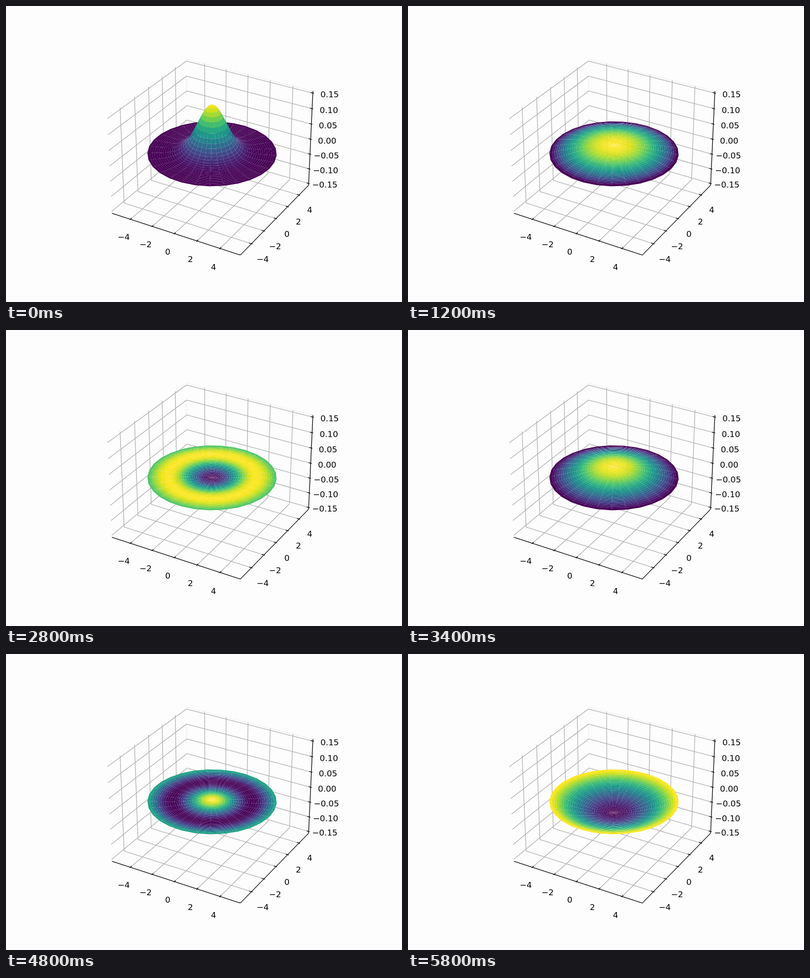
These frames come from a looping animation (800 px wide and 600 px high, 6 s). An HTML page with a canvas:

```html
<!DOCTYPE html>
<html lang="en">
<head>
<meta charset="utf-8">
<title>Vibrating membrane</title>
<style>
html, body { margin: 0; width: 100%; height: 100%; overflow: hidden; background: #fdfdfd; }
canvas { display: block; }
</style>
</head>
<body>
<canvas id="stage" width="800" height="600"></canvas>
<script>
const ctx = document.getElementById('stage').getContext('2d');

const STEP = 200, STEPS = 30;
const RADIUS = 5, RINGS = 29, SECTORS = 29;
const XY = 5.5 * 25 / 24, Z = 0.15 * 25 / 24;   // padded half sizes of the box
const TICK = 11 / 12;
const LINE = 1.33;

// Perspective camera: elevation 30, azimuth -60, distance 10.
const S3 = Math.sqrt(3);
function project(x, y, z) {
  const a = x / 11 * 8 / 7, b = y / 11 * 8 / 7, c = z / 0.3 * 6 / 7;
  const depth = 10 - (a * S3 / 4 - b * 0.75 + c / 2);
  const right = a * S3 / 2 + b / 2;
  const up = -a / 4 + b * S3 / 4 + c * S3 / 2;
  const k = 2497.3 / depth;
  return [416.24 + k * right, 296.76 - k * up, depth];
}

// Bessel function of order zero, from its integral form.
function bessel0(x) {
  let sum = 0;
  for (let i = 0; i < 24; i++) sum += Math.cos(x * Math.sin(Math.PI * (i + 0.5) / 24));
  return sum / 24;
}

const mix = (a, b, t) => a + (b - a) * t;
function smooth(from, to, t) {
  const u = Math.min(1, Math.max(0, (t - from) / (to - from)));
  return u * u * (3 - 2 * u);
}

// A hill that spreads into a dome, at p = distance / radius.
function hill(p, n) {
  const t = Math.min(n, 4);
  const peak = 0.152 + 0.0176 * t - 0.0096 * t * t;
  const narrow = Math.exp(-((p * RADIUS / 1.13) ** 2) / 2);
  return peak * mix(narrow, 1 - p * p, t / 4);
}

// The two lowest standing waves of a round membrane.
function standing(p, n) {
  const first = -0.04 * Math.cos(Math.PI * (n - 9.1) / 9.8);
  const second = -0.0045 * Math.cos(Math.PI * (n - 12) / 11);
  return first * bessel0(2.40483 * p) + second * bessel0(5.52008 * p);
}

const height = (p, n) => mix(hill(p, n), standing(p, n), smooth(4, 8, n));

// Polynomial fit of the viridis colour scale.
const VIRIDIS = [
  [0.27773, 0.10509, -0.33086, -4.63423, 6.22827, 4.77638, -5.43546],
  [0.00541, 1.40461, 0.21485, -5.7991, 14.17993, -13.74515, 4.64585],
  [0.3341, 1.38459, 0.09509, -19.33244, 56.69055, -65.35303, 26.31244]
];
function viridis(t) {
  const c = VIRIDIS.map(p => {
    const v = p.reduceRight((sum, k) => sum * t + k, 0);
    return Math.round(255 * Math.min(1, Math.max(0, v)));
  });
  return `rgb(${c})`;
}

function trace(points) {
  ctx.beginPath();
  points.forEach(([x, y]) => ctx.lineTo(x, y));
}

function path(points, color, width = LINE) {
  trace(points.map(p => project(...p)));
  ctx.strokeStyle = color;
  ctx.lineWidth = width;
  ctx.stroke();
}

function label(value, digits, ...point) {
  const [x, y] = project(...point);
  ctx.fillText(value.toFixed(digits).replace('-', '\u2212'), x, y + 13);
}

function drawAxes() {
  ctx.lineJoin = 'round';
  path([[-XY, XY, Z], [XY, XY, Z]], '#ececec', 1);
  path([[-XY, XY, 0.1], [-XY, XY, 0.035]], '#ececec', 1);

  const flat = [-4, -2, 0, 2, 4];
  const tall = [-3, -2, -1, 0, 1, 2, 3].map(n => n * 0.05);
  const gray = '#b0b0b0', black = '#000';
  flat.forEach(v => {
    path([[v, -XY, -Z], [v, XY, -Z], [v, XY, Z]], gray);
    path([[XY, v, -Z], [-XY, v, -Z], [-XY, v, Z]], gray);
  });
  tall.forEach(v => path([[-XY, -XY, v], [-XY, XY, v], [XY, XY, v]], gray));

  path([[-XY, -XY, -Z], [XY, -XY, -Z]], black);
  path([[XY, -XY, -Z], [XY, XY, -Z]], black);
  path([[XY, XY, -Z], [XY, XY, Z]], black);

  const inner = XY - 0.2 * TICK, outer = XY + 0.1 * TICK;
  const away = XY + 0.98, below = -Z - 0.028;
  ctx.font = '16.67px "DejaVu Sans", sans-serif';
  ctx.textAlign = 'center';
  ctx.fillStyle = black;
  flat.forEach(v => {
    path([[v, -inner, -Z], [v, -outer, -Z]], black);
    path([[inner, v, -Z], [outer, v, -Z]], black);
    label(v, 0, v, -away, below);
    label(v, 0, away, v, below);
  });
  tall.forEach(v => {
    path([[inner, XY, v], [outer, XY, v]], black);
    label(v, 2, away, away, v);
  });
}

function drawSurface(step) {
  const heights = Array.from({ length: RINGS + 1 }, (_, i) => height(i / RINGS, step));
  const grid = heights.map((z, i) => {
    const r = RADIUS * i / RINGS;
    return Array.from({ length: SECTORS + 1 }, (_, j) => {
      const a = 2 * Math.PI * j / SECTORS;
      return project(r * Math.cos(a), r * Math.sin(a), z);
    });
  });
  const means = heights.slice(1).map((z, i) => (z + heights[i]) / 2);
  const low = Math.min(...means), span = Math.max(...means) - low;
  const colors = means.map(z => viridis((z - low) / span));

  // Outline of the rim, under the faces.
  trace(grid[RINGS]);
  ctx.strokeStyle = colors[RINGS - 1];
  ctx.lineWidth = 1.6;
  ctx.stroke();

  const faces = [];
  colors.forEach((color, i) => {
    for (let j = 0; j < SECTORS; j++) {
      const corners = [grid[i][j], grid[i + 1][j], grid[i + 1][j + 1], grid[i][j + 1]];
      faces.push({ corners, color, depth: corners.reduce((s, p) => s + p[2], 0) });
    }
  });
  faces.sort((a, b) => b.depth - a.depth);
  for (const { corners, color } of faces) {
    trace(corners);
    ctx.fillStyle = color;
    ctx.fill();
  }
}

let shown = -1;
function render(step) {
  if (step === shown) return;
  shown = step;
  ctx.fillStyle = '#fdfdfd';
  ctx.fillRect(0, 0, 800, 600);
  drawAxes();
  drawSurface(step);
}

const start = performance.now();
function tick() {
  const time = performance.now() - start;
  render(Math.floor(time / STEP) % STEPS);
  requestAnimationFrame(tick);
}
tick();
</script>
</body>
</html>
```
